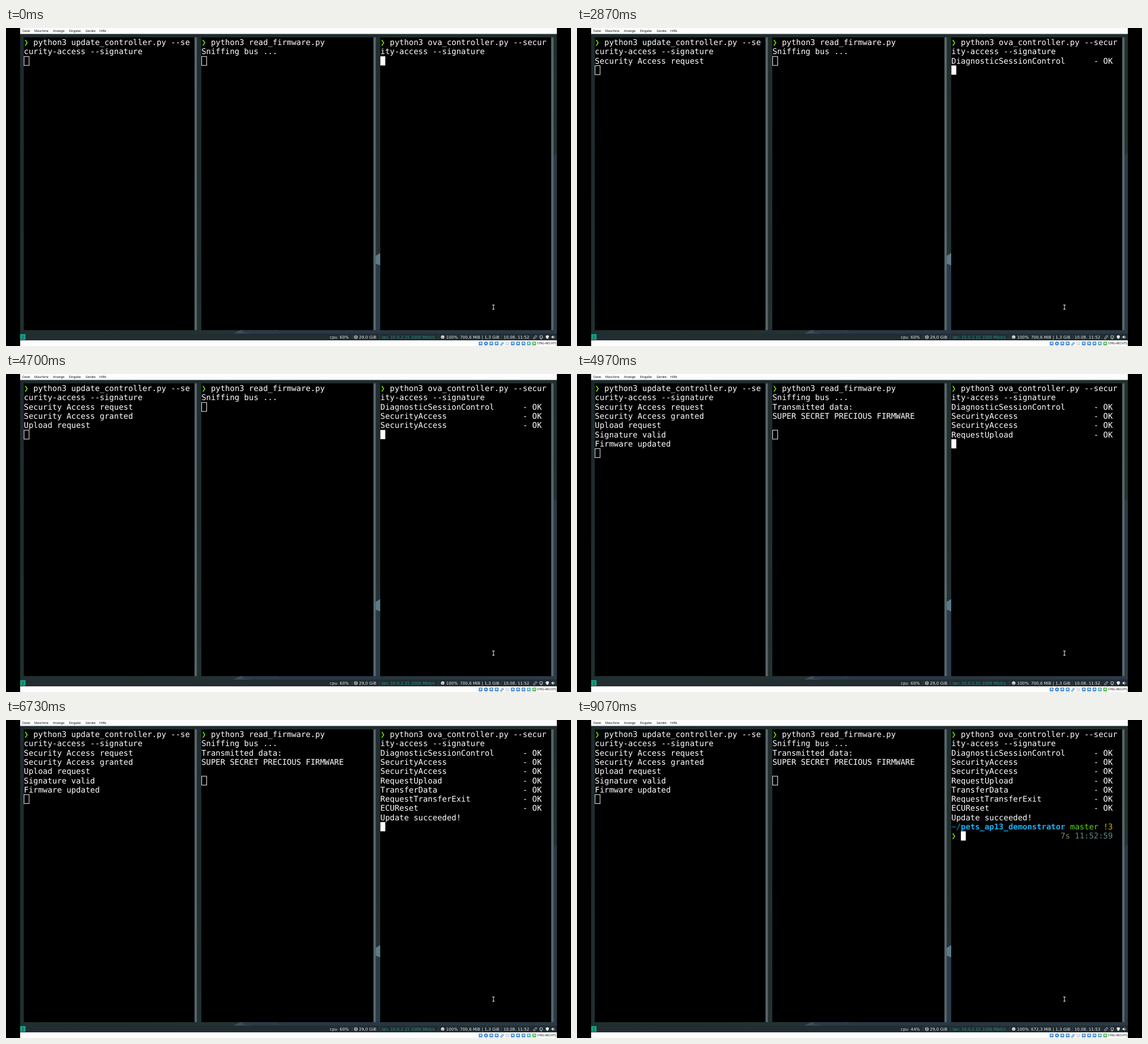
Write an HTML page that moves like this. It is 998 by 561 pixels and loops after 9260 ms.

```html
<!DOCTYPE html>
<html lang="de">
<head>
<meta charset="utf-8">
<title>Firmware update terminals</title>
<style>
  html, body { margin: 0; width: 100%; height: 100%; overflow: hidden; background: #000; }
  svg { display: block; width: 998px; height: 561px; }
  text { white-space: pre; text-rendering: geometricPrecision; }
  .term { font: 13.93px "DejaVu Sans Mono", monospace; fill: #fff; }
  .menu { font: 5.6px "Open Sans", sans-serif; fill: #000; }
  .status { font: 7.15px "DejaVu Sans", sans-serif; fill: #e4e8e9; }
</style>
</head>
<body>
<svg id="stage" viewBox="0 0 998 561">
  <defs>
    <linearGradient id="wall" x2="1" y2="1">
      <stop offset="0" stop-color="#1e2a2d"/>
      <stop offset=".6" stop-color="#22302f"/>
      <stop offset="1" stop-color="#2b3b48"/>
    </linearGradient>
  </defs>

  <!-- desktop -->
  <rect x="25" width="948" height="561" fill="url(#wall)"/>
  <path d="M967 224l6-4V540h-6z" fill="#2c3b49"/>
  <path d="M653 402l8-5v22l-8-3z" fill="#5b7b88"/>
  <path d="M653 416l8 3v120h-8z" fill="#2b3b48"/>
  <path d="M402 539l12-6h66l-8 6z" fill="#3d505b"/>
  <path d="M416 537l4-4h54l20 6h-60z" fill="#2c3a4a"/>
  <path d="M480 533h180v6H492z" fill="#293747"/>

  <!-- bars -->
  <rect x="25" width="948" height="10.5" fill="#fdfdfd"/>
  <rect x="25" y="539" width="948" height="12" fill="#222d32"/>
  <rect x="25" y="551" width="948" height="10" fill="#fdfdfd"/>
  <g class="menu">
    <text x="29" y="7.4">Datei</text>
    <text x="50" y="7.4">Maschine</text>
    <text x="83" y="7.4">Anzeige</text>
    <text x="111.5" y="7.4">Eingabe</text>
    <text x="140.5" y="7.4">Geräte</text>
    <text x="165" y="7.4">Hilfe</text>
    <text x="938" y="558.4" font-size="5.3" style="font-size:5.3px">STRG-RECHTS</text>
  </g>

  <g class="status">
    <rect x="25" y="540" width="9.5" height="10" fill="#16a085"/>
    <text x="27.5" y="547.6" style="fill:#173c37">2</text>
    <text x="572" y="547.8">cpu</text>
    <text id="cpu" x="589.6" y="547.8"></text>
    <text x="623.5" y="547.8">29,0 GiB</text>
    <text x="663.5" y="547.8" style="fill:#2a9484">lan: 10.0.2.15 1000 Mbit/s</text>
    <text x="777.5" y="547.8">100%</text>
    <text id="mem" x="802" y="547.8"></text>
    <text x="840.5" y="547.8">|</text>
    <text x="845.3" y="547.8">1,3 GiB</text>
    <text id="clock" x="878.7" y="547.8"></text>
    <path d="M611.5 541v8M659.5 541v8M764 541v8M875 541v8" stroke="#465257" stroke-width=".7"/>
    <g fill="none" stroke="#e4e8e9" stroke-width=".8">
      <ellipse cx="618" cy="543.7" rx="2.6" ry="1.1"/>
      <path d="M615.4 543.7v3.4c0 1.4 5.2 1.4 5.2 0v-3.4M615.4 545.5c0 1.3 5.2 1.3 5.2 0"/>
      <path d="M932 546.6l3.2-3.6c1.4-1.2 3 .4 1.8 1.7l-3 3.3c-1.7 1.5-3.1-.2-2-1.4z"/>
      <path d="M943 543h4.6v4h-4.6zM944 548.5h2.6"/>
      <path d="M968.3 543.5q1.6 1.6 0 3.6"/>
    </g>
    <circle cx="771.3" cy="545.3" r="3"/>
    <path d="M770 544.2v.8M772.6 544.2v.8M769.6 546.2q1.7 1.5 3.4 0" fill="none" stroke="#222d32" stroke-width=".7"/>
    <path d="M956.2 542l2.8 1c.2 3-1 4.700-2.8 5.600c-1.800-.9-3-2.600-2.800-5.600z"/>
    <path d="M963.300 544.300h1.500l2.200-2v6l-2.200-2h-1.500z"/>
  </g>
  <g id="tray"></g>
  <g id="panes" class="term"></g>

  <!-- pointer -->
  <path d="M859 488.600h1.200l.8.700.8-.7h1.200M861 489v6.800M859 496.200h1.200l.8-.7.8.7h1.200" fill="none" stroke="#dfe6ee" stroke-width="1.100"/>
</svg>
<script>
const LOOP = 9260, CELL = 8.386, ROW = 16.28, TOP = 17.3;
const GREEN = '#5fd700';
const $ = id => document.getElementById(id);

function add(parent, tag, attrs, text = '') {
  const el = document.createElementNS('http://www.w3.org/2000/svg', tag);
  for (const k in attrs) el.setAttribute(k, attrs[k]);
  el.textContent = text;
  parent.append(el);
  return el;
}

// Each line: [time, row, text, column, colour, weight]
const ok = (time, row, name) => [time, row, name.padEnd(30) + '- OK'];
const prompt = 7770;
const panes = [
  { x: 31.5, left: 31.5, right: 333, lines: [
    [0, 0, 'python3 update_controller.py --se', 2],
    [0, 1, 'curity-access --signature'],
    [2830, 2, 'Security Access request'],
    [3500, 3, 'Security Access granted'],
    [4170, 4, 'Upload request'],
    [4830, 5, 'Signature valid'],
    [4830, 6, 'Firmware updated']
  ] },
  { x: 345.2, left: 345, right: 649, lines: [
    [0, 0, 'python3 read_firmware.py', 2],
    [0, 1, 'Sniffing bus ...'],
    [4830, 2, 'Transmitted data:'],
    [4830, 3, 'SUPER SECRET PRECIOUS FIRMWARE'],
    [4830, 4, '']
  ] },
  { x: 661.3, left: 661, right: 963, active: true, lines: [
    [0, 0, 'python3 ova_controller.py --secur', 2],
    [0, 1, 'ity-access --signature'],
    ok(2830, 2, 'DiagnosticSessionControl'),
    ok(3500, 3, 'SecurityAccess'),
    ok(4170, 4, 'SecurityAccess'),
    ok(4830, 5, 'RequestUpload'),
    ok(5470, 6, 'TransferData'),
    ok(6130, 7, 'RequestTransferExit'),
    ok(6730, 8, 'ECUReset'),
    [6730, 9, 'Update succeeded!'],
    [prompt, 10, '~/', 0, '#0a95d5'],
    [prompt, 10, 'pets_ap13_demonstrator', 2, '#18b2f2', 'bold'],
    [prompt, 10, 'master', 25, GREEN],
    [prompt, 10, '!3', 32, '#d7af00'],
    [prompt, 11, '❯', 0, GREEN],
    [prompt, 11, '7s', 23, '#87875f'],
    [prompt, 11, '11:52:59', 26, '#5f8787']
  ] }
];

for (const p of panes) {
  const g = $('panes');
  add(g, 'rect', { x: p.left, y: 16.5, width: p.right - p.left, height: 516.5, fill: '#000' });
  add(g, 'rect', { x: p.right, y: 16.5, width: 4.2, height: 516.5, fill: '#566569' });
  p.lines.push([0, 0, '❯', 0, GREEN]);
  p.items = p.lines.map(([time, row, text, col = 0, fill = '#fff', weight = 'normal']) => ({
    time, row,
    el: add(g, 'text', {
      x: p.x + col * CELL, y: TOP + row * ROW + 12.8, fill, 'font-weight': weight
    }, text)
  }));
  p.cursor = add(g, 'rect', p.active
    ? { width: CELL + .3, height: ROW, fill: '#fff' }
    : { width: CELL + .5, height: ROW - .5, fill: 'none', stroke: '#f4f4f4' });
}

// Device indicators in the lower bar
for (let i = 0; i < 11; i++) {
  const cx = 838.3 + i * 9.47, g = $('tray');
  const pale = i === 5, fill = pale ? '#d5dae2' : i === 10 ? '#55b64b' : i === 9 ? '#58a9b5' : '#4389cf';
  if (i === 1) {
    add(g, 'circle', { cx, cy: 556.4, r: 3.5, fill });
    add(g, 'circle', { cx, cy: 556.4, r: 1.2, fill: '#e8f3fc' });
  } else if (i === 4) {
    add(g, 'path', { d: `M${cx - 3} 559l4-5 2 2-4 4z`, fill: '#b8d5ec', stroke: fill });
  } else {
    add(g, 'rect', { x: cx - 3.3, y: 553.2, width: 6.6, height: 6.6, rx: .6, fill });
    add(g, 'rect', { x: cx - 1.7, y: 554.8, width: 3.4, height: 2.6, fill: pale ? '#f0f2f5' : '#dcebf7' });
  }
}

function draw(now) {
  const t = now % LOOP;
  for (const p of panes) {
    let last = 0;
    for (const { time, row, el } of p.items) {
      const on = t >= time;
      el.setAttribute('visibility', on ? 'visible' : 'hidden');
      if (on) last = Math.max(last, row);
    }
    const atPrompt = p.active && t >= prompt;
    const inset = p.active ? 0 : .4;
    p.cursor.setAttribute('x', p.x + (atPrompt ? 2 * CELL : 0) + inset);
    p.cursor.setAttribute('y', TOP + (atPrompt ? last : last + 1) * ROW + inset);
  }
  const late = t >= 8200;
  $('cpu').textContent = late ? '44%' : '60%';
  $('mem').textContent = late ? '672,3 MiB' : '700,6 MiB';
  $('clock').textContent = late ? '10.08. 11:53' : '10.08. 11:52';
}

const start = performance.now();
function tick() {
  draw(performance.now() - start);
  requestAnimationFrame(tick);
}
tick();
</script>
</body>
</html>
```
